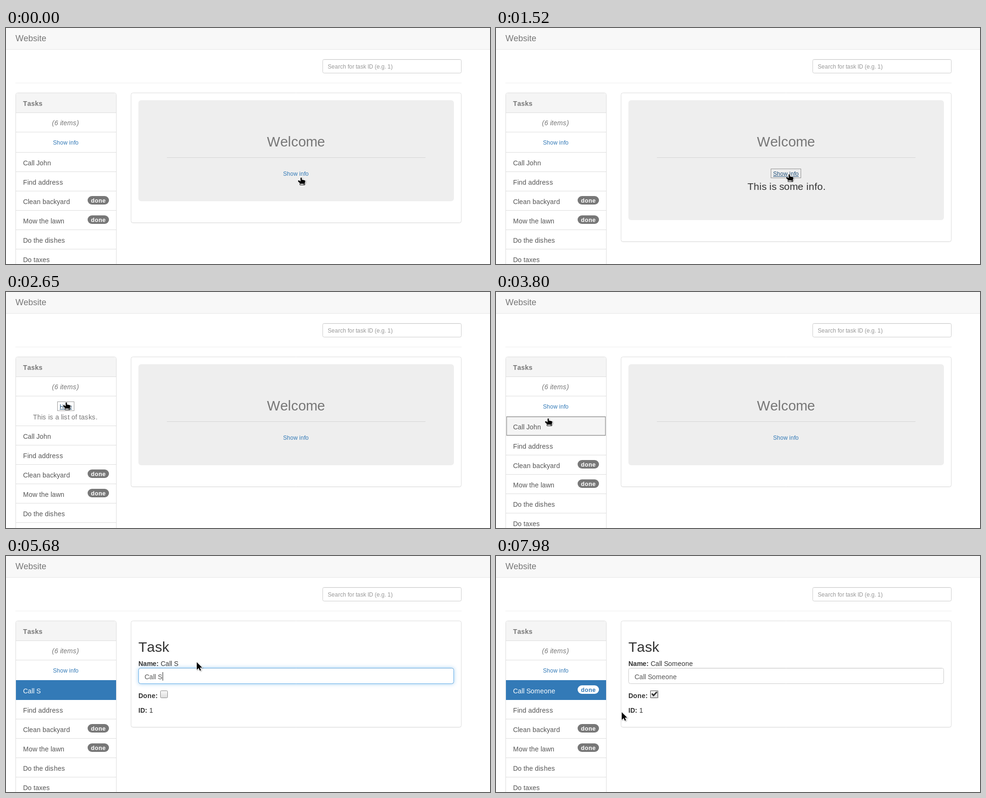
Animation of 1020 by 500 pixels, one loop 8 s. Source, as an HTML page with a canvas:

```html
<!DOCTYPE html>
<html lang="en">
<head>
<meta charset="utf-8">
<title>Task list</title>
<style>
  html, body { margin: 0; height: 100%; overflow: hidden; background: #fff; }
  canvas { display: block; }
</style>
</head>
<body>
<canvas id="stage" width="1020" height="500"></canvas>
<script>
const ctx = document.getElementById('stage').getContext('2d');
const LOOP = 8000;
const BLUE = '#337ab7', LINK_HOVER = '#23527c', GREY = '#777', DARK = '#333';

// [start, end, steps, x, y]: the pointer arrives at x,y after that many jumps
const MOVES = [
  [60, 270, 4, 618, 310],
  [1940, 2310, 10, 127, 234],
  [3310, 3570, 7, 110, 268],
  [4210, 4440, 6, 240, 288],
  [4480, 4690, 5, 403, 262],
  [5030, 5190, 5, 402, 225],
  [6320, 6490, 3, 402, 217],
  [7010, 7480, 11, 325, 320],
  [7520, 7740, 6, 333, 293],
  [7860, 7980, 3, 265, 331]
];
const KEY_TIMES = [5680, 5840, 5945, 6050, 6320, 6405, 6490];

const HAND = new Path2D('M-1.3 .5Q0-1 1.3 .5V4.3L8.5 6V10L7 12V13H-2.5V12L-6.5 8V6.2L-4.5 5.7L-1.3 8Z');
const ARROW = new Path2D('M0 0V16L4 12.5L6.5 18L9 17L6.5 11.5H11.5Z');
const BEAM = new Path2D('M-3.5-6.5H3.5M0-6.5V7.5M-3.5 7.5H3.5');

const clamp = v => Math.min(1, Math.max(0, v));
const swing = p => (1 - Math.cos(Math.PI * clamp(p))) / 2;
const within = (v, a, b) => v >= a && v < b;

function stepped(t, start, end, steps) {
  if (t < start) return 0;
  return Math.min(1, (Math.floor((t - start) / (end - start) * (steps - 1) + 1e-6) + 1) / steps);
}

const slide = (t, start, end) => swing(stepped(t, start, end, 4) * 1.2 - 0.08);

function pointerAt(t) {
  let x = 622, y = 317;
  for (const [start, end, steps, toX, toY] of MOVES) {
    const p = stepped(t, start, end, steps);
    const e = p * p * (3 - 2 * p);
    x += (toX - x) * e;
    y += (toY - y) * e;
  }
  return { x: Math.round(x), y: Math.round(y) };
}

// Places glyphs on whole pixels, like hinted screen text; returns the end x
function text(str, x, y, size, color, style = '') {
  ctx.font = `${style} ${size}px "Liberation Sans", Arial, sans-serif`;
  ctx.fillStyle = color;
  for (const c of str) {
    ctx.fillText(c, x, y);
    x += Math.round(ctx.measureText(c).width + (c === 's' && size === 14 ? 0.6 : 0));
  }
  return x;
}

function rect(x, y, w, h, color) {
  ctx.fillStyle = color;
  ctx.fillRect(x, y, w, h);
}

function box(x, y, w, h, radius, fill, stroke) {
  ctx.beginPath();
  ctx.roundRect(x, y, w, h, radius);
  if (fill) { ctx.fillStyle = fill; ctx.fill(); }
  if (stroke) { ctx.strokeStyle = stroke; ctx.lineWidth = 1; ctx.stroke(); }
}

function panel(x, y, w, h) {
  box(x, y + 1, w, h, 4, null, 'rgba(0,0,0,.05)');
  box(x, y, w, h, 4, '#fff', '#ddd');
}

function dotted(x, y, w, h, color) {
  ctx.strokeStyle = color;
  ctx.lineWidth = 1;
  ctx.setLineDash([1, 1]);
  ctx.strokeRect(x + 0.5, y + 0.5, w - 1, h - 1);
  ctx.setLineDash([]);
}

function link(label, x, y, hover, focus) {
  const end = text(label, x, y, 12, hover || focus ? LINK_HOVER : BLUE);
  if (hover || focus) rect(x, y + 1, end - x, 1, LINK_HOVER);
  if (focus) dotted(x - 5, y - 15, end - x + 10, 20, DARK);
}

function badge(y, fill, color) {
  box(172, y, 45, 18, 9, fill);
  text('done', 179, y + 14, 12.3, color, 'bold');
}

function drawHeader() {
  rect(0, 0, 1020, 45, '#f8f8f8');
  rect(0, 45, 1020, 1, '#e7e7e7');
  text('Website', 20, 28, 18, GREY);
  box(667.5, 66.5, 292, 29, 3, '#fff', '#ccc');
  rect(669, 67, 289, 1, '#eee');
  text('Search for task ID (e.g. 1)', 678, 86, 12, '#999');
  rect(20, 116, 940, 1, '#eee');
}

function drawSidebar(s) {
  panel(20.5, 137.5, 212, 400);
  box(21, 138, 211, 41, [3, 3, 0, 0], '#f5f5f5');
  text('Tasks', 36, 165, 14, GREY, 'bold');
  text('(6 items)', 97, 206, 14, GREY, 'italic');
  for (const y of [179, 220]) rect(21, y, 211, 1, '#ddd');
  link(s.listInfo ? 'Hide' : 'Show info', s.listInfo ? 113 : 99, 247, s.overSide, s.focus === 'side');
  if (s.listInfo) text('This is a list of tasks.', 57, 270, 14, GREY);

  const names = [s.name, 'Find address', 'Clean backyard', 'Mow the lawn', 'Do the dishes', 'Do taxes'];
  const top = s.listInfo ? 283 : 263;
  names.forEach((name, i) => {
    const y = top + i * 41;
    const active = i === 0 && s.taskView;
    rect(21, y, 211, 1, '#ddd');
    if (s.overRows && within(s.y, y, y + 41)) rect(21, y + 1, 211, 40, '#f5f5f5');
    if (active) rect(21, y, 211, 42, BLUE);
    text(name, 36, y + 28, 14, active ? '#fff' : '#555');
    if (i === 2 || i === 3) badge(y + 11, GREY, '#fff');
  });
  if (s.taskView) rect(21, 304, 211, 1, BLUE);
  if (s.done) badge(274, '#fff', BLUE);
  if (s.focus === 'row') dotted(22, 264, 209, 40, s.taskView ? '#e0bd98' : '#111');
}

function drawWelcome(s) {
  const grow = Math.round(45 * s.open);
  panel(263.5, 137.5, 696, 275 + grow);
  box(279, 153, 665, 214 + grow, 6, '#eee');
  text('Welcome', 550, 251, 29.3, GREY);
  rect(339, 274, 545, 1, '#d5d5d5');
  if (s.open) {
    ctx.save();
    ctx.beginPath();
    ctx.rect(279, 318, 665, 30 * s.open);
    ctx.clip();
    text('This is some info.', 530, 343, 20.9, DARK);
    ctx.restore();
  }
  link('Show info', 584, 313, s.overMain, s.focus === 'main');
}

function drawInput(s) {
  ctx.save();
  ctx.shadowColor = `rgba(102,175,233,${0.6 * s.glow})`;
  ctx.shadowBlur = 8;
  box(279, 237, 665, 34, 4, '#fff');
  ctx.restore();
  box(279.5, 237.5, 664, 33, 4, '#fff', '#ccc');
  rect(281, 238, 661, 1, '#eee');
  ctx.globalAlpha = s.glow;
  box(279.5, 237.5, 664, 33, 4, null, '#66afe9');
  ctx.globalAlpha = 1;

  const end = text(s.name, 292, 261, 14, '#555');
  if (s.selected) {
    rect(320, 246, end - 320, 18, '#4a90d9');
    text(s.name.slice(5), 320, 261, 14, '#fff');
  }
  if (s.caret) rect(end + 1, 246, 1, 18, '#222');
}

function drawCheckbox(s) {
  const shade = ctx.createLinearGradient(0, 285, 0, 301);
  shade.addColorStop(0, '#fafafa');
  shade.addColorStop(1, '#dcdcdc');
  box(325.5, 285.5, 15, 15, 2, shade, '#8a8a8a');
  if (s.done) {
    ctx.strokeStyle = DARK;
    ctx.lineWidth = 3;
    ctx.stroke(new Path2D('M328.5 291.5L332 295.5L339 288'));
  }
  if (s.focus === 'check') dotted(325, 285, 17, 16, '#111');
}

function drawTask(s) {
  panel(263.5, 137.5, 696, 225);
  text('Task', 279, 203, 30, DARK);
  text(s.name, text('Name:', 279, 233, 14, DARK, 'bold') + 4, 233, 14, DARK);
  drawInput(s);
  text('Done:', 279, 301, 14, DARK, 'bold');
  drawCheckbox(s);
  text('1', text('ID:', 279, 332, 14, DARK, 'bold') + 4, 332, 14, DARK);
}

function drawPointer(s) {
  ctx.save();
  ctx.translate(s.x, s.y);
  ctx.lineJoin = 'round';
  ctx.shadowColor = 'rgba(0,0,0,.3)';
  ctx.shadowBlur = 2;
  ctx.shadowOffsetX = ctx.shadowOffsetY = 1;
  const overInput = s.taskView && within(s.x, 279, 944) && within(s.y, 237, 271);
  const overLink = s.overRows || s.overSide || s.overMainArea;
  ctx.strokeStyle = '#fff';
  if (overInput) {
    ctx.translate(0.5, 0);
    ctx.lineWidth = 3;
    ctx.stroke(BEAM);
    ctx.shadowColor = 'transparent';
    ctx.strokeStyle = '#000';
    ctx.lineWidth = 1.3;
    ctx.stroke(BEAM);
  } else {
    const shape = overLink ? HAND : ARROW;
    ctx.lineWidth = 2;
    ctx.stroke(shape);
    ctx.shadowColor = 'transparent';
    ctx.fillStyle = '#000';
    ctx.fill(shape);
    if (overLink) {
      box(-2.5, 12.5, 10, 3, 0, '#fff', '#000');
      rect(5, 13, 1, 2, '#000');
    }
  }
  ctx.restore();
}

function focusAt(t) {
  if (t < 270) return '';
  if (t < 2550) return 'main';
  if (t < 3800) return 'side';
  if (t < 4760) return 'row';
  return t < 7800 ? 'input' : 'check';
}

function stateAt(t) {
  const { x, y } = pointerAt(t);
  const typed = KEY_TIMES.filter(time => t >= time).length;
  const taskView = t >= 3960;
  const listInfo = within(t, 2650, 3270);
  const overMainArea = !taskView && within(x, 584, 639) && within(y, 300, 319);
  const selected = within(t, 4990, 5680);
  const focus = focusAt(t);
  return {
    x, y, taskView, listInfo, overMainArea, selected, focus,
    name: 'Call ' + (typed ? 'Someone'.slice(0, typed) : 'John'),
    overMain: overMainArea && t >= 60,
    overSide: within(x, 99, 154) && within(y, 233, 252),
    overRows: within(x, 21, 232) && y >= (listInfo ? 283 : 263),
    open: slide(t, 430, 630) - slide(t, 1520, 1700),
    done: t >= 7860,
    glow: swing((t - 4760) / 150) - swing((t - 7800) / 150),
    caret: focus === 'input' && !selected && !within(t, 7010, 7510)
  };
}

function render(now) {
  const s = stateAt(now % LOOP);
  rect(0, 0, 1020, 500, '#fff');
  drawHeader();
  drawSidebar(s);
  (s.taskView ? drawTask : drawWelcome)(s);
  drawPointer(s);
}

const begin = performance.now();
function tick() {
  render(performance.now() - begin);
  requestAnimationFrame(tick);
}
tick();
</script>
</body>
</html>
```
